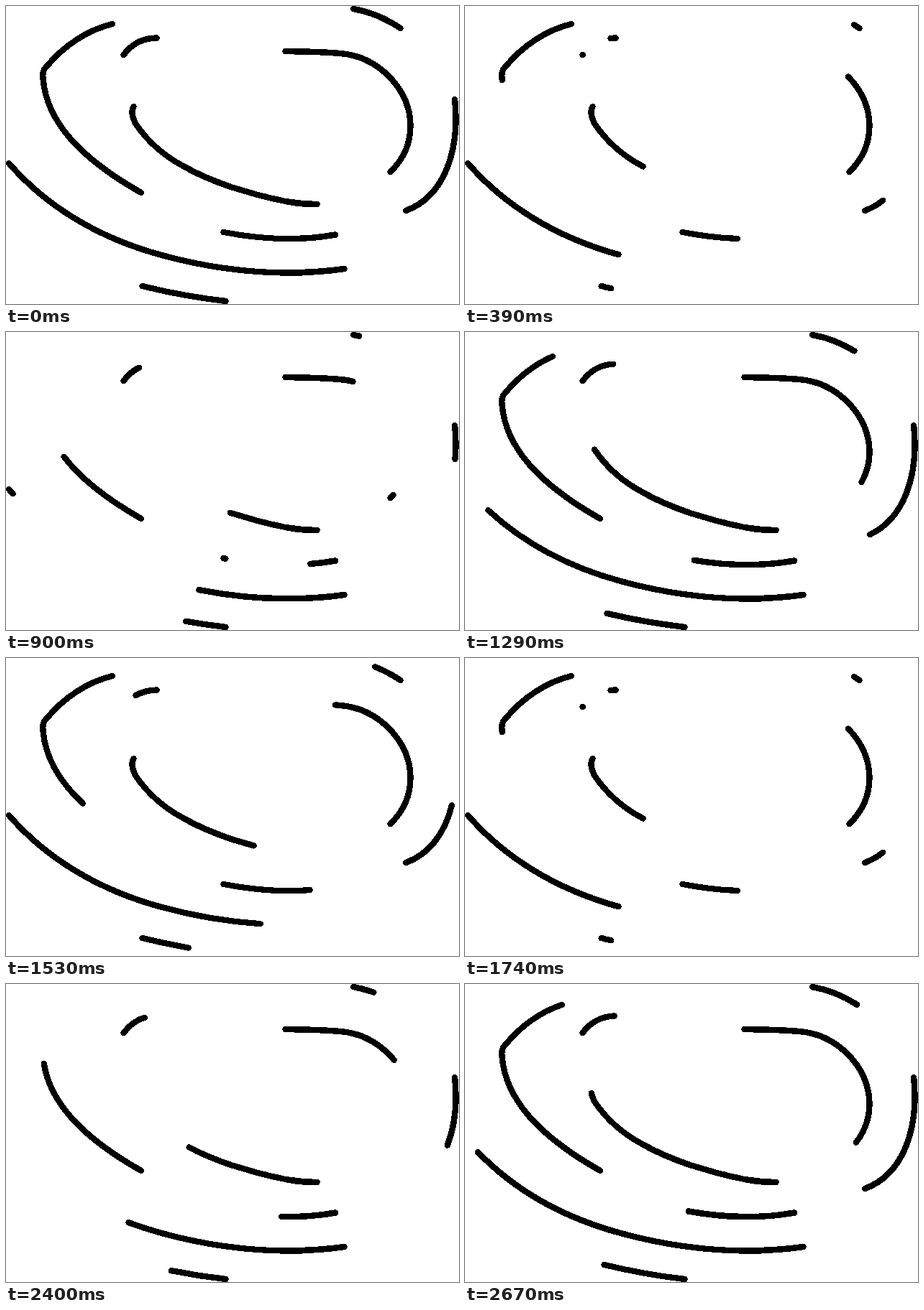
An HTML page with a canvas that plays this animation: 630 by 415 pixels, repeating every 2.7 s.

```html
<!DOCTYPE html>
<html lang="en">
<head>
<meta charset="utf-8">
<title>Swirl strokes</title>
<style>
html, body { margin: 0; width: 100%; height: 100%; overflow: hidden; background: #fff; }
canvas { display: block; }
</style>
</head>
<body>
<canvas id="stage" width="630" height="415"></canvas>
<script>
const WIDTH = 630, HEIGHT = 415;
const CYCLE = 1350;
const STEP = 30;
const ctx = document.getElementById('stage').getContext('2d', { willReadFrequently: true });

// d: path, out: time the old stroke takes to vanish,
// from/to: times between which the new stroke grows back from the far end
const strokes = [
  { d: 'M148.5 25C115 33 82 54 57 84C52 89 51 93 52 102C57 160 102 211 188.5 260', out: 800, from: 600 },
  { d: 'M178 140C174 147 176 153 180 163C196 187 220 209 249 224C268 235 290 244 313 252L347 262C385 272 405 276 433 276', out: 795, from: 600 },
  { d: 'M4.5 219C58 281 132 324 217 347C298 369 385 378 471 366', out: 985, from: 600 },
  { d: 'M303 315C355 325 405 328 458.5 318.5', out: 990, from: 770 },
  { d: 'M535 231C572 195 573 139 533 98C515 80 492 68 465 66Q440 63.5 389 63', out: 990, from: 695 },
  { d: 'M190 390Q246 404 306 411', out: 525, from: 495 },
  { d: 'M210 44.5C190 45 176 52 164 68', out: 535, from: 385 },
  { d: 'M549 31Q518 10 483.5 4', out: 530, from: 840 },
  { d: 'M556.5 285C608 266 632 205 624.5 130', out: 560, from: 756, to: 1314 }
].map(({ d, out, from, to = CYCLE }) => {
  const node = document.createElementNS('http://www.w3.org/2000/svg', 'path');
  node.setAttribute('d', d);
  return { path: new Path2D(d), length: node.getTotalLength(), out, from, to };
});

const clamp = v => Math.max(0, Math.min(1, v));

const bezier = (p1, p2, s) => 3 * (1 - s) ** 2 * s * p1 + 3 * (1 - s) * s * s * p2 + s ** 3;

// Linear start, soft landing
function easeOut(x) {
  if (x >= 1) return 1;
  let lo = 0, hi = 1;
  for (let i = 0; i < 24; i++) {
    const mid = (lo + hi) / 2;
    if (bezier(1 / 6, 2 / 3, mid) < x) lo = mid; else hi = mid;
  }
  return bezier(1 / 6, 1, lo);
}

function drawPart({ path, length }, start, end) {
  if (end <= start) return;
  const whole = start === 0 && end === 1;
  ctx.setLineDash(whole ? [] : [(end - start) * length, length * 4]);
  ctx.lineDashOffset = -start * length;
  ctx.stroke(path);
}

// Pure black and white, without soft edges
function hardenEdges() {
  const image = ctx.getImageData(0, 0, WIDTH, HEIGHT);
  const { data } = image;
  for (let i = 0; i < data.length; i += 4) {
    data[i] = data[i + 1] = data[i + 2] = data[i] < 128 ? 0 : 255;
  }
  ctx.putImageData(image, 0, 0);
}

function draw(t) {
  ctx.setTransform(1, 0, 0, 1, 0, 0);
  ctx.fillStyle = '#fff';
  ctx.fillRect(0, 0, WIDTH, HEIGHT);
  ctx.translate(-0.4, 0);
  ctx.strokeStyle = '#000';
  ctx.lineWidth = 8.4;
  ctx.lineCap = ctx.lineJoin = 'round';
  for (const stroke of strokes) {
    const { out, from, to } = stroke;
    drawPart(stroke, 0, 1 - easeOut(clamp(t / out)));
    drawPart(stroke, clamp((to - t) / (to - from)), 1);
  }
  hardenEdges();
}

let origin, shown;
function tick(now) {
  origin ??= now;
  const t = (now - origin) % CYCLE;
  const step = Math.floor(t / STEP + 1e-3);
  if (step !== shown) draw(step * STEP);
  shown = step;
  requestAnimationFrame(tick);
}
draw(0);
requestAnimationFrame(tick);
</script>
</body>
</html>
```
